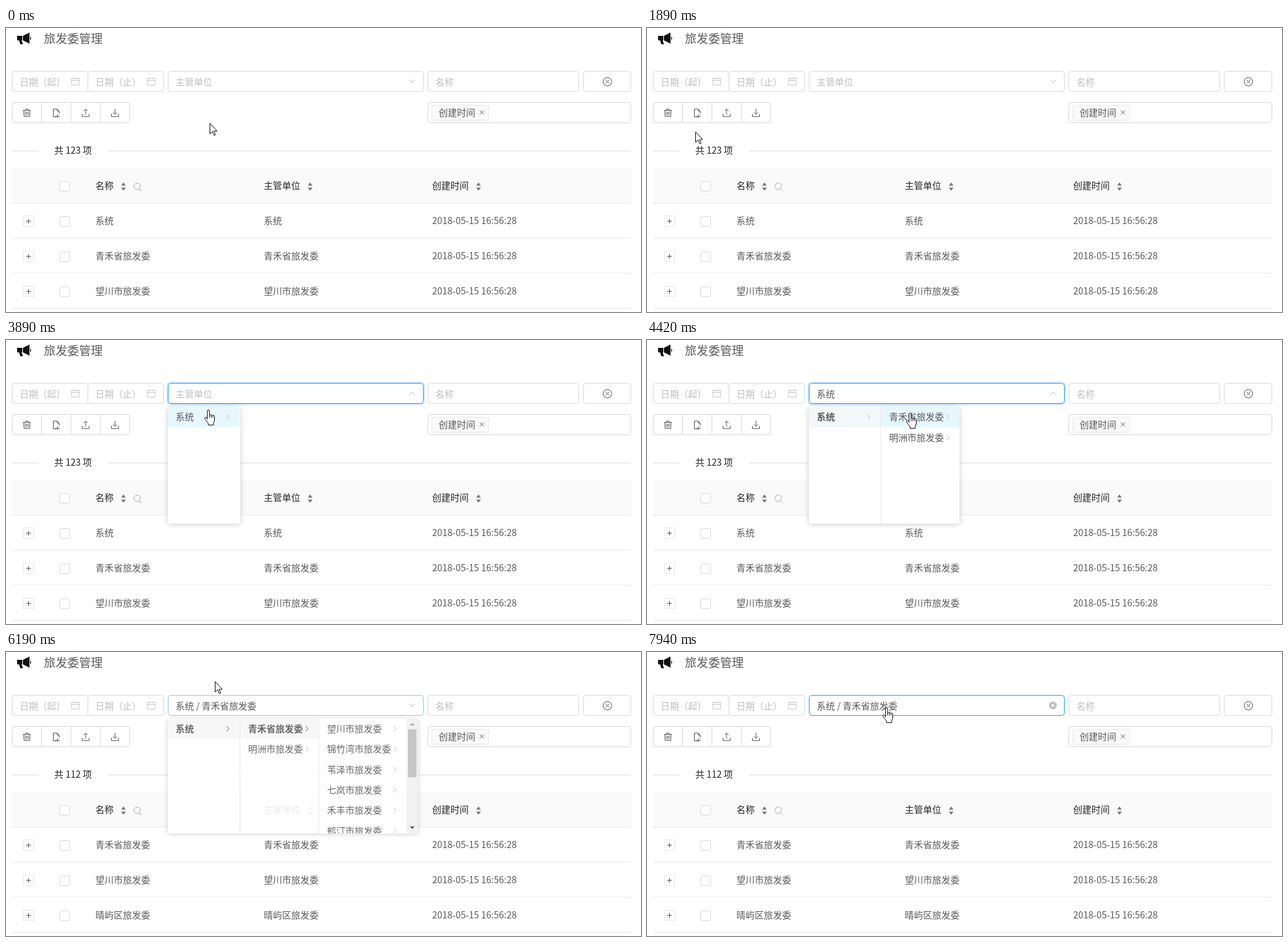
Write an HTML page that moves like this. It is 973x436 px and loops after 8000 ms.

```html
<!DOCTYPE html>
<html lang="zh-CN">
<head>
<meta charset="utf-8">
<style>
  html, body { margin: 0; width: 100%; height: 100%; overflow: hidden; background: #fff; }
  svg { display: block; width: 100vw; height: 100vh; }
  text { font-family: "Noto Sans CJK SC", "Noto Sans CJK", "Noto Sans", sans-serif; white-space: pre; }
  .shadow { filter: drop-shadow(0 1px 4px rgba(0, 0, 0, .2)); }
</style>
</head>
<body>
<svg viewBox="0 0 973 436">
  <defs><clipPath id="menuClip"><rect x="248" y="102" width="383" height="180" rx="4"/></clipPath></defs>
  <g id="page"></g><g id="live"></g>
</svg>
<script>
const LOOP = 8000, TICK = 111, TICK_SLACK = 28;
const INK = '#595959', DARK = '#262626', PALE = '#bfbfbf', EDGE = '#d9d9d9', RULE = '#e8e8e8';
const GRAY_RGB = [217, 217, 217], BLUE_RGB = [30, 165, 236];
const WHITE_RGB = [255, 255, 255], HOVER_RGB = [230, 247, 255], CHOSEN_RGB = [247, 247, 247];

const PROVINCE = '青禾省旅发委', CAPITAL = '望川市旅发委';
const CITIES = [CAPITAL, '锦竹湾市旅发委', '苇泽市旅发委', '七岚市旅发委', '禾丰市旅发委', '鹤汀市旅发委'];

const START = 330, HOVER = 2990, OPEN = 3310, PICK_ROOT = 4190, PICK_PROVINCE = 4870;
const LOADED = 5080, LEAVE = 5750, CLOSE = 6080, RETURN = 7730;

// Pointer stops: arrival time, x, y. The pointer eases from each to the next.
const STOPS = [
  [220, 312, 146], [480, 362, 118], [1010, 112, 166], [1230, 162, 190], [1890, 74, 159], [2100, 36, 190],
  [2890, 358, 95], [3100, 384, 79], [3400, 384, 79], [4090, 285, 118], [4200, 285, 118], [4420, 403, 113],
  [5200, 403, 113], [5640, 370, 78], [5870, 362, 37], [6190, 320, 45], [6800, 84, 172], [7620, 343, 90],
  [7940, 367, 86]
];

const ramp = (t, from, to) => Math.min(1, Math.max(0, (t - from) / (to - from)));
const ease = p => p * p * (3 - 2 * p);
const mix = (a, b, p) => `rgb(${a.map((v, i) => Math.round(v + (b[i] - v) * p))})`;

const text = (x, middle, string, fill = INK, size = 14, extra = '') =>
  `<text x="${x}" y="${middle + size * .37}" font-size="${size}" fill="${fill}" ${extra}>${string}</text>`;
const fillRect = (x, y, w, h, fill, extra = '') =>
  `<rect x="${x}" y="${y}" width="${w}" height="${h}" fill="${fill}" ${extra}/>`;
const box = (x, y, w, h, stroke = EDGE, radius = 4, fill = '#fff') =>
  fillRect(x + .5, y + .5, w - 1, h - 1, fill, `stroke="${stroke}" rx="${radius}"`);
const ring = (x, y, r, stroke) => `<circle cx="${x}" cy="${y}" r="${r}" fill="none" stroke="${stroke}"/>`;
const line = (d, stroke = INK, width = 1) => `<path d="${d}" fill="none" stroke="${stroke}" stroke-width="${width}"/>`;
const shape = (d, fill) => `<path d="${d}" fill="${fill}"/>`;
const cross = (x, y, r, ...style) => line(`M${x - r} ${y - r}l${2 * r} ${2 * r}m0 ${-2 * r}l${-2 * r} ${2 * r}`, ...style);
const chevron = (x, y, color) => line(`M${x - 2} ${y - 4}l4 4-4 4`, color);
const sorter = x => shape(`M${x - 3.5} 242l3.5-5 3.5 5zm0 3h7l-3.5 5z`, '#857a77');
const checkbox = middle => box(82, middle - 8, 16, 16, EDGE, 2);
const rowMiddle = i => 296 + 54 * i;

const dateInput = (x, label) => box(x, 66, 117, 32) + text(x + 12, 83, label, PALE)
  + line(`M${x + 91.5} 77.5h12v10h-12zm0 3h12m-9-5v3m6-3v3`, '#cacaca');

const column = (x, title, sortX) => text(x, 242, title, DARK) + sorter(sortX);

function drawToolbar() {
  const icons = [
    'M-6-3.5h12m-8 0v-2h4v2m-6.500 0v9h9v-9m-6.500 2v5m2-5v5m2-5v5',
    'M0 6.500h-4.500v-12h6l3 3v4m-3-7v3h3m-2.500 5v6m-3-3h6',
    'M-5.500 2v4h11v-4m-5.500 1v-8.500m-3 3l3-3 3 3',
    'M-5.500 2v4h11v-4m-5.500-8v8.500m-3-3l3 3 3-3'
  ];
  return box(9, 114, 181, 32) + icons.map((d, i) =>
    `<g transform="translate(${32 + 45 * i} 130)">${line(d)}${i ? line('M-22.5-16v32', EDGE) : ''}</g>`).join('');
}

function drawPage() {
  const title = shape('M17 12h8v7h-8zM20 19h4l2 6h-4zM26 12l10-5v17l-10-5zM37 13q3 2.500 0 6z', '#111')
    + text(58, 16.5, '旅发委管理', INK, 18);
  const filters = dateInput(9, '日期（起）') + dateInput(125, '日期（止）')
    + box(646, 66, 232, 32) + text(658, 83, '名称', PALE)
    + box(884, 66, 74, 32) + ring(921.5, 82.5, 6.5, INK) + cross(921.5, 82.5, 2.5);
  const tag = box(646, 114, 312, 32) + box(652, 118, 88, 24, RULE, 2, '#fafafa')
    + text(663, 130, '创建时间') + cross(729, 129.5, 3);
  const header = fillRect(9, 188, 41, 1.5, RULE) + fillRect(156, 188, 802, 1.5, RULE)
    + fillRect(9, 215, 949, 53, '#fafafa') + fillRect(9, 268, 949, 1, RULE) + checkbox(243)
    + column(137, '名称', 180) + column(395, '主管单位', 466) + column(653, '创建时间', 724)
    + ring(201, 243, 5, '#b0b0b0') + line('M204.5 246.500l4 4', '#b0b0b0');
  let rows = '';
  for (let i = 0; i < 3; i++) {
    const y = rowMiddle(i);
    rows += box(26, y - 8, 17, 17, RULE, 0) + line(`M31 ${y + .5}h7m-3.500-3.500v7`) + checkbox(y + 1)
      + text(653, y, '2018-05-15 16:56:28') + fillRect(9, y + 26, 949, 1, RULE);
  }
  return title + filters + drawToolbar() + tag + header + rows;
}

function drawTable(t) {
  const loaded = t >= LOADED;
  const names = loaded ? [PROVINCE, CAPITAL, '晴屿区旅发委'] : ['系统', PROVINCE, CAPITAL];
  return text(74, 188, `共 ${loaded ? 112 : 123} 项`, DARK)
    + names.map((name, i) => [137, 395].map(x => text(x, rowMiddle(i), name)).join('')).join('');
}

function drawSelect(t) {
  const blue = ramp(t, HOVER - 50, HOVER + 110) - ramp(t, CLOSE, CLOSE + 170) + ramp(t, RETURN - 90, RETURN + 110);
  const glow = ramp(t, OPEN - 10, OPEN + 110) - ramp(t, CLOSE - 60, CLOSE + 60);
  const open = t >= OPEN && t < CLOSE + TICK;
  const value = t < PICK_ROOT ? '主管单位' : t < PICK_PROVINCE ? '系统' : '系统 / ' + PROVINCE;
  const icon = t >= RETURN
    ? `<circle cx="622" cy="82" r="6" fill="${PALE}"/>` + cross(622, 82, 2, '#fff', 1.2)
    : line(open ? 'M617.5 84.500l4.500-4.500 4.500 4.500' : 'M617.5 79.500l4.500 4.500 4.500-4.500', PALE);
  return `<rect x="247" y="65" width="394" height="34" rx="5" fill="none" stroke="#1890ff" stroke-width="2" opacity="${.2 * glow}"/>`
    + box(248, 66, 392, 32, mix(GRAY_RGB, BLUE_RGB, blue))
    + text(260, 82.5, value, t < PICK_ROOT ? PALE : INK) + icon;
}

function option(x, width, index, name, background = '#fff', bold = false, arrowColor = PALE) {
  const y = 102 + 32 * index;
  return fillRect(x, y, width, 32, background) + chevron(x + width - 18, y + 16, arrowColor)
    + text(x + 12, y + 16, name, INK, 14, bold ? 'font-weight="700"' : '');
}

function drawMenu(t) {
  const shown = ramp(t, OPEN, OPEN + 220) ** .5 - ramp(t, CLOSE, CLOSE + 200) ** 4;
  if (shown <= 0) return '';
  const rootPicked = t >= PICK_ROOT, provincePicked = t >= PICK_PROVINCE;
  const arrow = provincePicked ? INK : PALE;
  const rootFill = rootPicked
    ? mix(HOVER_RGB, CHOSEN_RGB, ramp(t, PICK_ROOT, PICK_ROOT + 340))
    : mix(WHITE_RGB, HOVER_RGB, pointerAt(t)[1] > 102 ? 1 : 0);
  let width = 111, items = option(248, 110, 0, '系统', rootFill, rootPicked, arrow);
  if (rootPicked) {
    const fill = provincePicked
      ? mix(HOVER_RGB, CHOSEN_RGB, ramp(t, PICK_PROVINCE, PICK_PROVINCE + 300))
      : mix(WHITE_RGB, HOVER_RGB, ramp(t, PICK_ROOT, PICK_ROOT + 200));
    width = 231;
    items += option(359, 120, 0, PROVINCE, fill, provincePicked, arrow)
      + option(359, 120, 1, '明洲市旅发委') + fillRect(358, 102, 1, 180, RULE);
  }
  if (provincePicked) {
    width = 383;
    items += CITIES.map((name, i) => option(480, 134, i, name)).join('')
      + fillRect(479, 102, 1, 180, RULE) + fillRect(614, 102, 17, 180, '#f1f1f1') + fillRect(616, 119, 13, 75, '#c1c1c1')
      + shape('M618.5 113h8l-4-4z', '#a3a3a3') + shape('M618.5 271h8l-4 4z', '#505050');
  }
  return `<g opacity="${shown}" transform="translate(0 102) scale(1 ${.8 + .2 * shown}) translate(0 -102)">`
    + fillRect(248, 102, width, 180, '#fff', 'rx="4" class="shadow"')
    + `<g clip-path="url(#menuClip)">${items}</g></g>`;
}

function pointerAt(t) {
  const next = STOPS.findIndex(([time]) => time > t);
  if (next < 1) return STOPS.at(next).slice(1);
  const [t0, x0, y0] = STOPS[next - 1], [t1, x1, y1] = STOPS[next];
  const p = ease(ramp(t, t0, t1));
  return [Math.round(x0 + (x1 - x0) * p), Math.round(y0 + (y1 - y0) * p)];
}

function drawPointer(t) {
  const [x, y] = pointerAt(t);
  const hand = t >= HOVER && t < LEAVE || t >= RETURN;
  const outline = hand
    ? 'M5.5 14.500V2a1.600 1.600 0 0 1 3.200 0V8.500a1.400 1.400 0 0 1 2.700.5a1.400 1.400 0 0 1 2.600.6a1.300 1.300 0 0 1 2.500.8V16q0 2-1.500 4v3.500h-8v-2.500q-2.500-3-5-7q-1-2 .5-2.600q1.500-.4 3 2.600z'
    : 'M.5.5V16.500l3.700-3.600 2.600 6 2.200-1-2.600-5.700h5z';
  return `<g transform="translate(${hand ? x - 7 : x} ${hand ? y - 1 : y})">`
    + `<path d="${outline}" fill="#fff" stroke="#111" stroke-linejoin="round"/>`
    + (hand ? line('M8.7 8.500v4m2.700-3.500v3.500m2.600-3v3', '#111') : '') + '</g>';
}

// The picture advances in even ticks that restart after each pause.
function lastTick(t) {
  const start = [START, OPEN, PICK_PROVINCE, CLOSE].findLast(pause => pause <= t);
  return start ? start + TICK * Math.floor((t - start + TICK_SLACK) / TICK) : 0;
}

const live = document.getElementById('live');
let drawn = -1;

function frame() {
  const t = lastTick(performance.now() % LOOP);
  if (t !== drawn) {
    drawn = t;
    live.innerHTML = drawTable(t) + drawSelect(t) + drawMenu(t) + drawPointer(t);
  }
  requestAnimationFrame(frame);
}

document.getElementById('page').innerHTML = drawPage();
frame();
</script>
</body>
</html>
```
